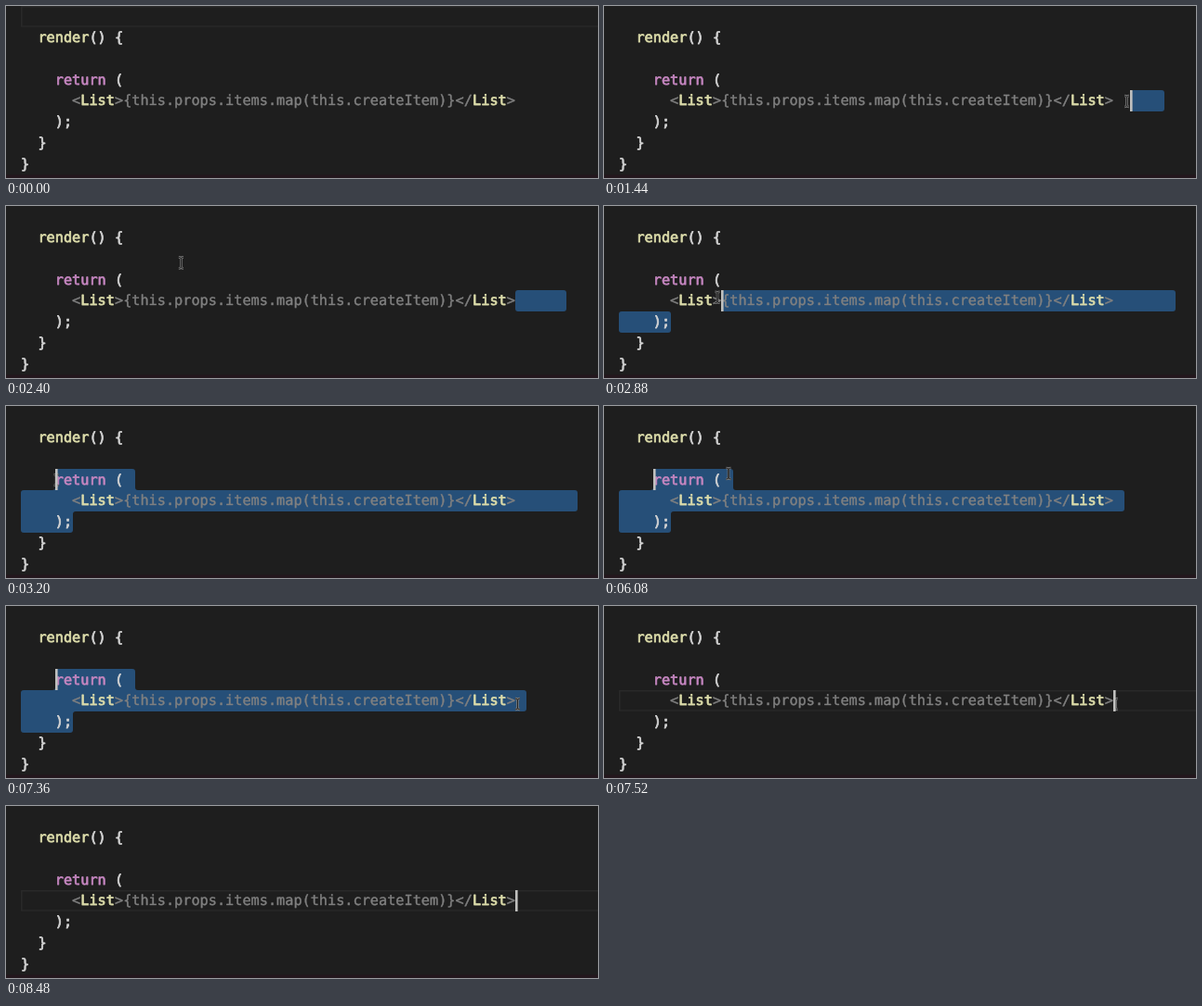
An HTML page with a canvas for the animation above (8.64 s loop, 637 px wide and 186 px high).

```html
<!DOCTYPE html>
<html lang="en">
<head>
<meta charset="utf-8">
<title>Code selection</title>
<style>
html, body { margin: 0; width: 100%; height: 100%; overflow: hidden; background: #1e1e1e; }
canvas { display: block; }
</style>
</head>
<body>
<canvas id="stage" width="637" height="186"></canvas>
<script>
const ctx = document.getElementById('stage').getContext('2d');
const W = 637, H = 186, LOOP = 8640, STEP = 160, BLINK = 480;
const LEFT = 16.6, CHAR = 9.17, LINE = 22.75, NEWLINE = 12;
const PLAIN = '#d4d4d4', DIM = '#808080';
const WORD_COLORS = { render: '#dcdcaa', List: '#dcdcaa', return: '#c586c0' };

const code = [
  '',
  '  render() {',
  '',
  '    return (',
  '      <List>{this.props.items.map(this.createItem)}</List>      ',
  '    );',
  '  }',
  '}'
];
const TRIM_TIME = 5760, EXIT_TIME = 8160;

// Pointer strokes, each a curve from the previous end; drags move the caret.
const moves = [
  { start: 0, end: 1120, via: [520, 124], to: [608, 103] },
  { start: 1120, end: 1760, via: [547, 103], to: [548, 103], drag: true },
  { start: 1920, end: 2560, via: [300, -50], to: [74, 131] },
  { start: 2560, end: 3200, via: [180, 92], to: [54, 80], drag: true },
  { start: 3520, end: 3680, via: [94, 76], to: [134, 73] },
  { start: 6720, end: 7360, via: [380, -10], to: [550.5, 106] },
  { start: 7520, end: 7520, via: [550.5, 106], to: [550.5, 106], drag: true },
  { start: 7840, end: 8000, via: [500, 140], to: [424, 176] }
];
moves.forEach((m, i) => { m.from = i ? moves[i - 1].to : [370, 124]; });

const colX = col => LEFT + col * CHAR;
const rowY = row => Math.round(row * LINE);
const lineAt = (row, t) => t < TRIM_TIME ? code[row] : code[row].trimEnd();

function positionOn({ start, end, from, via, to }, t) {
  const s = Math.min(1, (t - start) / (end - start || 1));
  if (s === 1) return to;
  const r = 1 - s;
  return from.map((v, i) => r * r * v + 2 * r * s * via[i] + s * s * to[i]);
}

function caretAt([x, y], t) {
  const row = Math.floor(y / LINE);
  const col = Math.round((x + 3 - LEFT) / CHAR);
  return { row, col: Math.min(col, lineAt(row, t).length) };
}

function fillOutline(rows) {
  const pts = [];
  for (const r of rows) pts.push([r.x1, r.y0], [r.x1, r.y1]);
  for (const r of [...rows].reverse()) pts.push([r.x0, r.y1], [r.x0, r.y0]);
  const first = rows[0];
  ctx.beginPath();
  ctx.moveTo((first.x0 + first.x1) / 2, first.y0);
  pts.forEach((p, i) => ctx.arcTo(...p, ...pts[(i + 1) % pts.length], 3));
  ctx.closePath();
  ctx.fill();
}

function drawSelection(a, b, t) {
  const [first, last] = [a, b].sort((p, q) => p.row - q.row || p.col - q.col);
  const rows = [];
  for (let row = first.row; row <= last.row; row++) {
    rows.push({
      y0: rowY(row),
      y1: rowY(row + 1),
      x0: row === first.row ? Math.round(colX(first.col)) : 16,
      x1: Math.round(row === last.row
        ? colX(last.col) : colX(lineAt(row, t).length) + NEWLINE)
    });
  }
  ctx.fillStyle = '#264f78';
  const apart = rows.length > 1 && rows[0].x0 > rows[1].x1;
  (apart ? rows.map(r => [r]) : [rows]).forEach(fillOutline);
}

function drawLineHighlight(row) {
  ctx.strokeStyle = '#292929';
  ctx.lineWidth = 1.6;
  ctx.strokeRect(16.8, rowY(row) + 0.8, W, LINE - 1.6);
}

function drawWord(text, col, row, color) {
  const x = colX(col) - 0.5, y = row * LINE + 16.4;
  ctx.fillStyle = ctx.strokeStyle = color;
  ctx.lineWidth = color === DIM ? 0.4 : 0.75;
  ctx.fillText(text, x, y);
  ctx.strokeText(text, x, y);
}

function drawCode() {
  ctx.font = '15.23px "DejaVu Sans Mono", monospace';
  ctx.textRendering = 'geometricPrecision';
  ctx.lineJoin = 'round';
  code.forEach((line, row) => {
    const base = line.includes('<') ? DIM : PLAIN;
    let col = 0;
    for (const part of line.split(/\b(render|return|List)\b/)) {
      drawWord(part, col, row, WORD_COLORS[part] || base);
      col += part.length;
    }
  });
}

function drawPointer([x, y]) {
  const beam = new Path2D();
  for (const side of [-2.5, 2.5]) {
    beam.moveTo(x + side, y - 6);
    beam.quadraticCurveTo(x, y - 6, x, y - 4);
    beam.lineTo(x, y + 4);
    beam.quadraticCurveTo(x, y + 6, x + side, y + 6);
  }
  for (const [width, color] of [[2.6, '#7c7c7c'], [1, '#252525']]) {
    ctx.lineWidth = width;
    ctx.strokeStyle = color;
    ctx.stroke(beam);
  }
}

function drawCaret({ row, col }) {
  ctx.fillStyle = '#c0c0be';
  ctx.fillRect(Math.floor(colX(col)), rowY(row), 2.6, rowY(row + 1) - rowY(row));
}

function draw(t) {
  ctx.fillStyle = '#1e1e1e';
  ctx.fillRect(0, 0, W, H);
  ctx.fillStyle = '#23171d';
  ctx.fillRect(0, 182.5, W, 3.5);

  const started = moves.filter(m => m.start <= t);
  const move = started[started.length - 1];
  const drag = started.filter(m => m.drag).pop();
  const caret = drag ? caretAt(positionOn(drag, t), t) : { row: 0, col: 0 };
  const anchor = drag ? caretAt(drag.from, t < TRIM_TIME ? 0 : t) : caret;

  if (anchor.row === caret.row && anchor.col === caret.col) drawLineHighlight(caret.row);
  else drawSelection(anchor, caret, t);

  drawCode();
  if (t > 0 && t < EXIT_TIME) drawPointer(positionOn(move, t));

  // The blink restarts whenever a drag ends.
  const idle = drag ? Math.max(0, t - drag.end) : BLINK;
  if (idle % (2 * BLINK) < BLINK) drawCaret(caret);
}

const start = performance.now();
function tick() {
  const t = (performance.now() - start) % LOOP;
  draw(Math.floor(t / STEP) * STEP);
  requestAnimationFrame(tick);
}
tick();
</script>
</body>
</html>
```
